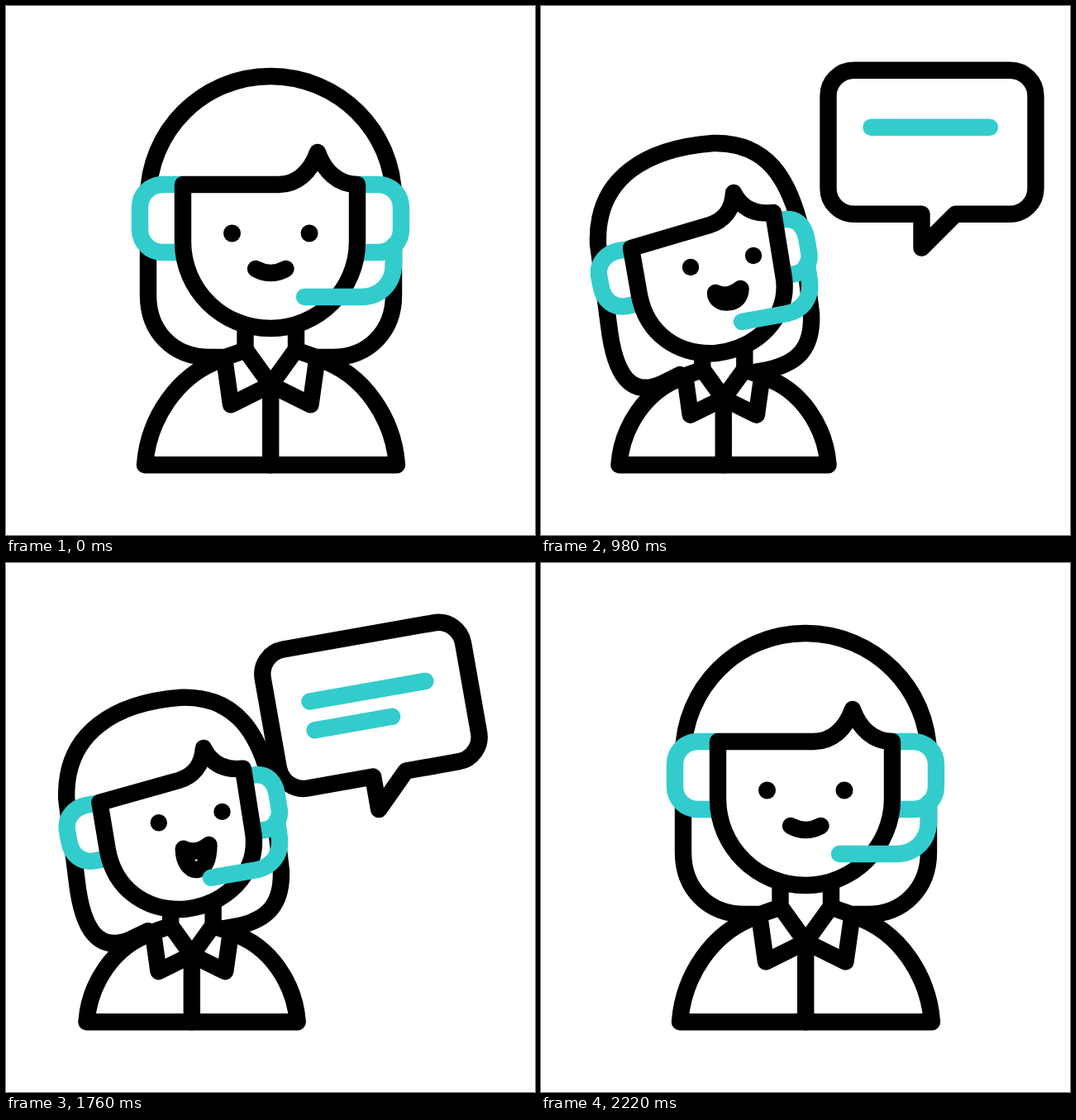
Animation of 640 by 640 pixels, one loop 2400 ms. Source, as an HTML page:

```html
<!DOCTYPE html>
<html lang="en">
<head>
<meta charset="utf-8">
<title>Support agent</title>
<style>
  html, body { margin: 0; width: 100%; height: 100%; overflow: hidden; background: #fff; }
  svg { display: block; width: 100%; height: 100%; }
  path { fill: none; stroke: #000; stroke-width: 20.4; stroke-linecap: round; stroke-linejoin: round; vector-effect: non-scaling-stroke; }
  .white { fill: #fff; }
  .plain { stroke: none; }
  .teal { stroke: #33cccc; }
</style>
</head>
<body>
<svg viewBox="0 0 640 640">
  <g id="bubble">
    <path class="white" d="M0 0V-41H-82A31 31 0 0 1 -113 -72V-184A31 31 0 0 1 -82 -215H107A31 31 0 0 1 138 -184V-72A31 31 0 0 1 107 -41H41Z"/>
    <path id="line1" class="teal"/>
    <path id="line2" class="teal"/>
  </g>
  <path id="hair" class="white"/>
  <g id="body">
    <path class="white plain" d="M168 555C172 500 207 445 262 427H379C434 445 469 500 473 555Z"/>
    <path d="M262 427C207 445 172 500 168 555H473C469 500 434 445 379 427"/>
    <path d="M289.5 385V416M351 385V416M320.2 458V555"/>
    <path class="white" d="M320.2 458L290 416L264 425L272 482Z"/>
    <path class="white" d="M320.2 458L350.5 416L376.5 425L368.5 482Z"/>
  </g>
  <path id="leftEar" class="white teal"/>
  <path id="rightEar" class="white teal"/>
  <path id="face" class="white"/>
  <circle id="leftEye"/>
  <circle id="rightEye"/>
  <path id="mouth"/>
  <path id="mic" class="teal"/>
</svg>
<script>
const LOOP = 2400;
const TIP = [460.5, 292.7];
const $ = id => document.getElementById(id);
const lerp = (a, b, k) => a + (b - a) * k;

const ease = (t, from, to) => {
  const u = Math.min(1, Math.max(0, (t - from) / (to - from)));
  return u * u * (3 - 2 * u);
};

// Each part: upright pose, then leaning pose with the same commands.
const parts = {
  hair: [
    "M262 425 L247 425 C200 425 172 392 172 350 L172 233 C172 151 238 85 320 85 C402 85 469 151 469 233 L469 350 C469 392 440 425 395 425 L378 425",
    "M168 446 L148 456 C108 475 89 446 82 386 L69 288 C66 206 130 172 208 166 C275 164 300 212 314 268 L327 372 C329 415 310 432 275 440 L258 443"
  ],
  face: [
    "M214 216 L330 216 C351 216 368 202 377 177 C385 200 402 216 425 216 L425 285 C425 343 378 390 320 390 C261 390 214 343 214 285 Z",
    "M109 293 L204 265 C220 260 232 247 233 226 C242 244 258 253 281 250 L294 330 C300 377 262 414 212 420 C166 423 128 397 119 350 Z"
  ],
  leftEar: [
    "M214 216 L190 216 C174 216 162 228 162 244 L162 270 C162 286 174 298 190 298 L214 298",
    "M112 293 L94 296 C79 299 68 311 70 326 L73 341 C76 356 88 366 104 363 L118 360"
  ],
  rightEar: [
    "M425 216 L450 216 C466 216 478 228 478 244 L478 270 C478 286 466 298 450 298 L425 298",
    "M285 260 L296 258 C310 257 318 266 321 280 L324 297 C327 312 318 322 308 324 L296 326"
  ],
  mic: [
    "M469 290 L469 312 C469 336 452 352 430 352 L361 352",
    "M322 312 L325 334 C327 354 316 368 298 372 L243 382"
  ]
};

const morph = ([from, to], k) => {
  const ends = to.match(/\d+/g);
  let i = 0;
  return from.replace(/\d+/g, n => lerp(+n, +ends[i++], k).toFixed(2));
};

const mouthKeys = [[200, 5], [700, 28.5], [950, 13], [1200, 32], [1450, 13], [1700, 28.5], [2200, 5]];

function mouthDepth(t) {
  return mouthKeys.slice(1).reduce((depth, [time, value], i) =>
    depth + (value - mouthKeys[i][1]) * ease(t, mouthKeys[i][0], time), mouthKeys[0][1]);
}

function drawMouth(t, lean) {
  const lx = lerp(302, 211, lean), ly = lerp(318, 347, lean);
  const rx = lerp(338.5, 241.5, lean), ry = lerp(318, 342, lean);
  const depth = mouthDepth(t);
  const midX = (lx + rx) / 2, midY = (ly + ry) / 2;
  const bottomX = midX + 2 * lean, bottomY = midY + depth;
  const inset = 6 * (1 - lean), side = depth * 0.6;
  const reach = 9, tilt = 1.5 * lean;
  $("mouth").setAttribute("d",
    `M${lx} ${ly}Q${midX} ${midY + 10} ${rx} ${ry}` +
    `C${rx - inset} ${ry + side} ${bottomX + reach} ${bottomY - tilt} ${bottomX} ${bottomY}` +
    `C${bottomX - reach} ${bottomY + tilt} ${lx + inset} ${ly + side} ${lx} ${ly}Z`);
}

function drawEye(id, from, to, lean) {
  const eye = $(id);
  eye.setAttribute("cx", lerp(from[0], to[0], lean));
  eye.setAttribute("cy", lerp(from[1], to[1], lean));
  eye.setAttribute("r", lerp(10.5, 10.2, lean));
}

function drawLine(id, y, length, grown) {
  const line = $(id);
  line.style.display = grown > 0 ? "" : "none";
  line.setAttribute("d", `M-61 ${y}H${-61 + length * grown + 0.01}`);
}

function drawBubble(t, lean) {
  const away = 1 - lean;
  const leaving = t > 1200;
  const arc = leaving ? 150 : 190;
  const x = TIP[0] - 228 * away;
  const y = TIP[1] + arc * away * lean - 12 * away;
  const angle = leaving
    ? -10 * ease(t, 1340, 1760) + 100 * ease(t, 1760, 2145)
    : 90 * away;
  const size = 1 - (leaving ? 0.48 : 0.3) * away;
  const bubble = $("bubble");
  bubble.style.display = lean > 0 ? "" : "none";
  bubble.setAttribute("transform", `translate(${x} ${y}) rotate(${angle}) scale(${size})`);
  drawLine("line1", -146, 145, ease(t, 700, 1000));
  drawLine("line2", -110, 97, ease(t, 1000, 1300));
}

function draw(t) {
  const lean = ease(t, 200, 700) - ease(t, 1700, 2200);
  for (const id in parts) $(id).setAttribute("d", morph(parts[id], lean));
  const size = lerp(1, 0.83, lean);
  $("body").setAttribute("transform",
    `translate(${lerp(320.5, 221, lean)} 555.3) scale(${size}) translate(-320.5 -555)`);
  drawEye("leftEye", [273.5, 275], [181, 316], lean);
  drawEye("rightEye", [367, 275], [257, 302], lean);
  drawMouth(t, lean);
  drawBubble(t, lean);
}

const start = performance.now();
function tick() {
  draw((performance.now() - start) % LOOP);
  requestAnimationFrame(tick);
}
tick();
</script>
</body>
</html>
```
